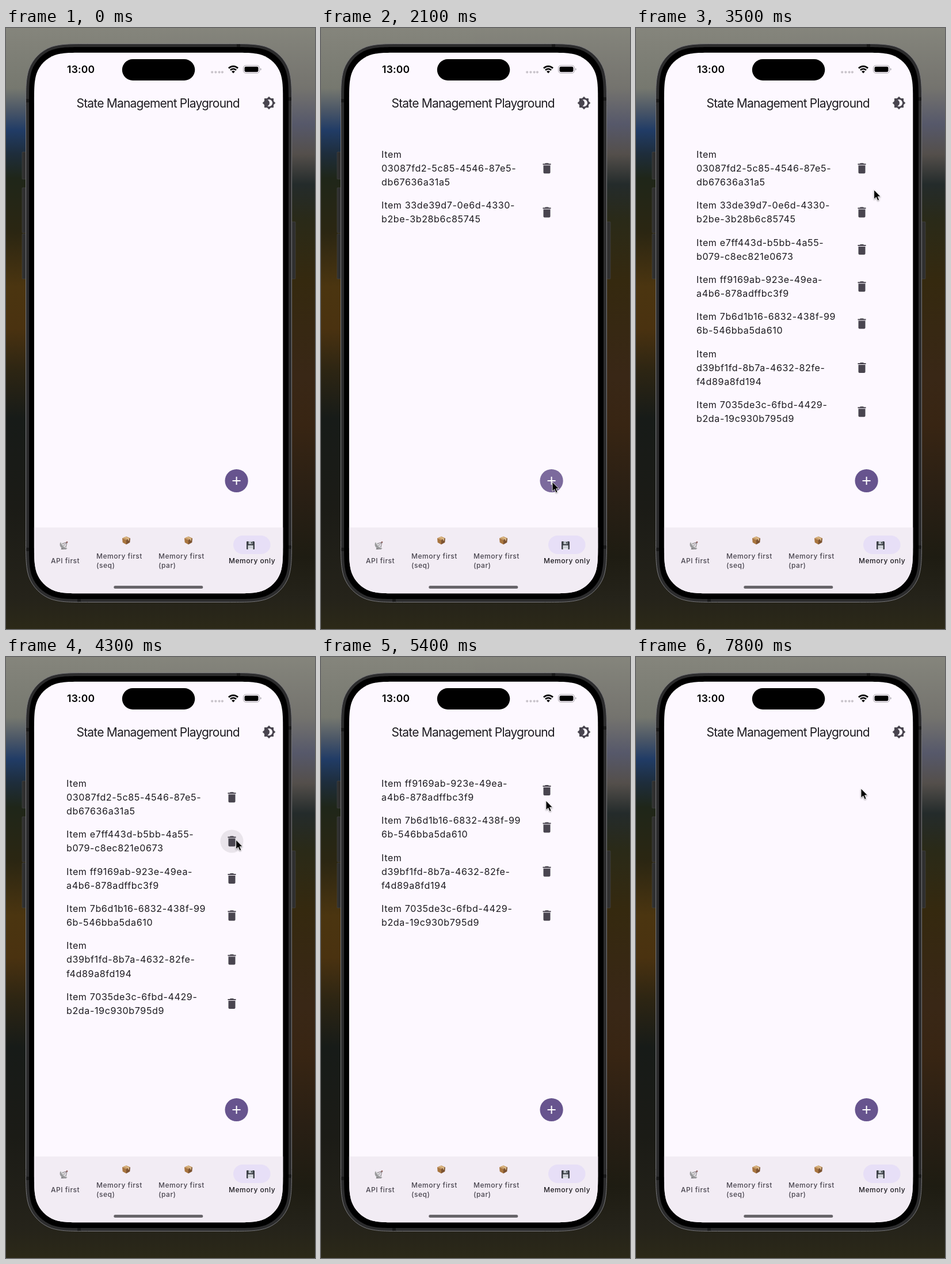
Animation, 537 px wide and 1042 px high, one loop 8 s. Source, as an HTML page:

```html
<!DOCTYPE html>
<html lang="en">
<head>
<meta charset="utf-8">
<title>State Management Playground</title>
<style>
  html, body { margin: 0; width: 100%; height: 100%; overflow: hidden; background: #25241a; }
  svg { display: block; width: 100%; height: 100%; }
  text { font-family: Inter, Roboto, sans-serif; font-optical-sizing: none; fill: #1d1b20; }
  .item { font-size: 16.08px; letter-spacing: .61px; }
  .nav { font-size: 12.06px; font-weight: 500; letter-spacing: .5px; fill: #49454f; }
  .nav.on { fill: #1d1b20; }
  #cursor { filter: drop-shadow(0 1px 1px #0006); }
</style>
</head>
<body>
<svg viewBox="0 0 537 1042">
  <defs>
    <linearGradient id="left" x2="0" y2="1">
      <stop offset="0" stop-color="#85857c"/>
      <stop offset=".1" stop-color="#76786f"/>
      <stop offset=".135" stop-color="#4d5867"/>
      <stop offset=".17" stop-color="#213c66"/>
      <stop offset=".21" stop-color="#1e2d3b"/>
      <stop offset=".25" stop-color="#1f2619"/>
      <stop offset=".34" stop-color="#2b2612"/>
      <stop offset=".43" stop-color="#4b3510"/>
      <stop offset=".5" stop-color="#4a3210"/>
      <stop offset=".57" stop-color="#2d2513"/>
      <stop offset=".65" stop-color="#171b18"/>
      <stop offset=".8" stop-color="#1b1b16"/>
      <stop offset=".95" stop-color="#25231a"/>
      <stop offset="1" stop-color="#2c2918"/>
    </linearGradient>
    <linearGradient id="right" x2="0" y2="1">
      <stop offset="0" stop-color="#85857c"/>
      <stop offset=".1" stop-color="#74736e"/>
      <stop offset=".16" stop-color="#56586a"/>
      <stop offset=".21" stop-color="#544f4b"/>
      <stop offset=".26" stop-color="#242b2b"/>
      <stop offset=".32" stop-color="#2a2a18"/>
      <stop offset=".42" stop-color="#35290f"/>
      <stop offset=".58" stop-color="#392716"/>
      <stop offset=".66" stop-color="#382513"/>
      <stop offset=".78" stop-color="#291f14"/>
      <stop offset=".88" stop-color="#1e1c12"/>
      <stop offset=".95" stop-color="#25231a"/>
      <stop offset="1" stop-color="#2c2918"/>
    </linearGradient>
    <clipPath id="clip"><path id="screen"/></clipPath>
    <path id="trash" fill="#49454f" d="M6 19c0 1.1.9 2 2 2h8c1.1 0 2-.9 2-2V7H6zM19 4h-3.5l-1-1h-5l-1 1H5v2h14z"/>
    <g id="box">
      <path fill="#c99d68" d="M0-7 7-4 0-1-7-4z"/>
      <path fill="#a8753f" d="M-7-4 0-1V7L-6.3 3.6z"/>
      <path fill="#7d5330" d="M7-4 0-1V7L6.3 3.6z"/>
      <path fill="#e3c795" d="M-3.7-5.4 3.3-2.4V.5L5-.3V-3.2L-2-6.2z"/>
    </g>
  </defs>

  <rect width="268.5" height="1042" fill="url(#left)"/>
  <rect x="268" width="269" height="1042" fill="url(#right)"/>

  <!-- phone body -->
  <g fill="#2f2f2f" stroke="#484848" stroke-width=".6">
    <rect x="28" y="215" width="8" height="47" rx="1"/>
    <rect x="28" y="277" width="8" height="78" rx="1"/>
    <rect x="28" y="357" width="8" height="78" rx="1"/>
    <rect x="495" y="336" width="8" height="99" rx="1"/>
  </g>
  <path id="body" fill="#2c2c2d" stroke="#77777a"/>
  <path fill="#1a1a1a" d="M401 28h6v5h-6zM124 990h6v5h-6zM35 123h5v6h-5zM35 901h5v6h-5zM491 120h5v6h-5zM491 897h5v6h-5z"/>
  <path id="bezel"/>

  <g clip-path="url(#clip)">
    <rect x="48" y="42" width="434" height="939" fill="#fdf8ff"/>
    <rect x="48" y="866" width="434" height="115" fill="#f2ecf4"/>
  </g>

  <!-- status bar -->
  <text x="130.2" y="78.3" text-anchor="middle" font-size="17.5" font-weight="600" letter-spacing=".2" style="fill:#000">13:00</text>
  <rect x="201.8" y="54" width="126.5" height="37" rx="18.5"/>
  <path d="M358.2 76.6h.01m6.2 0h.01m6.2 0h.01m5.3 0h.01" stroke="#c9c4cb" stroke-width="4.2" stroke-linecap="round"/>
  <path d="M387 69.8a11.1 11.1 0 0 1 16 0M390 73a7 7 0 0 1 10 0" fill="none" stroke="#000" stroke-width="2.8"/>
  <path d="M395 78.5l-2.9-3a4 4 0 0 1 5.8 0z"/>
  <rect x="412.5" y="65" width="28" height="13.2" rx="4.2" fill="none" stroke="#a5a1a8"/>
  <rect x="414.5" y="67" width="24" height="9.2" rx="2.6"/>
  <path d="M442 69.5q1.6.6 1.6 2.1t-1.6 2.1z" fill="#a5a1a8"/>

  <!-- app bar -->
  <text x="264.2" y="138.2" text-anchor="middle" font-size="21" letter-spacing="-.8">State Management Playground</text>
  <path transform="translate(445 118)" fill="#49454f" d="M20 8.69V4h-4.69L12 .69 8.69 4H4v4.69L.69 12 4 15.31V20h4.69L12 23.31 15.31 20H20v-4.69L23.31 12zM12 18c-.89 0-1.74-.2-2.5-.55C11.56 16.5 13 14.42 13 12s-1.44-4.5-3.5-5.45C10.26 6.2 11.11 6 12 6c3.31 0 6 2.69 6 6s-2.69 6-6 6z"/>

  <!-- navigation bar -->
  <rect x="395" y="880" width="64.5" height="32" rx="16" fill="#e7dff7"/>
  <g transform="translate(101 897)">
    <path d="M-3 2-5.5 7H4L0 2z" fill="#77777a"/>
    <path d="M-6.5-5.5A8.5 8.5 0 0 0 5.5 5.5z" fill="#9a9a9c"/>
    <path d="M-6.5-5.5Q2-2 5.5 5.5-3 3-6.5-5.5z" fill="#d6d6d8"/>
    <path d="M-1 .5 5-5.5M-3-3 5-5.5 3 3" fill="none" stroke="#5b5356" stroke-width=".8"/>
    <circle cx="5" cy="-5.5" r="1.3" fill="#8c5a55"/>
  </g>
  <use href="#box" x="209" y="888.5"/>
  <use href="#box" x="317" y="888.5"/>
  <g transform="translate(418 890)">
    <path d="M0 1q0-1 1-1h12l1 1v12q0 1-1 1H1q-1 0-1-1z" fill="#3c4047"/>
    <path d="M3.5 0h7v5h-7z" fill="#b9bec5"/>
    <path d="M8 1h1.6v3H8z" fill="#3c4047"/>
    <path d="M2.5 7h9v7h-9z" fill="#e4e6ea"/>
    <path d="M3.5 9h7m-7 2h7" stroke="#9b9fb0" stroke-width=".7"/>
  </g>
  <text class="nav" x="78" y="928.3">API first</text>
  <text class="nav" x="157" y="920.3">Memory first<tspan x="157" dy="16">(seq)</tspan></text>
  <text class="nav" x="265" y="920.3">Memory first<tspan x="265" dy="16">(par)</tspan></text>
  <text class="nav on" x="387" y="928.3">Memory only</text>
  <rect x="187.3" y="967" width="155" height="5" rx="2.5" fill="#676469"/>

  <circle id="splash" cx="392.5" r="20" fill="#e9e4eb"/>
  <g id="list"></g>
  <circle id="fab" cx="400.6" cy="785" r="20.1"/>
  <path d="M393.6 785h14m-7-7v14" stroke="#fff" stroke-width="2"/>
  <path id="cursor" d="M0 0V16.3L3.8 12.8 6.4 18.8 9.1 17.6 6.6 11.8H11.5z" stroke="#fff" stroke-width=".9"/>
</svg>

<script>
const LOOP = 8000, TICK = 100, LINE = 24.12, GAP = 16.08, TOP = 207;

// text lines, time added, time deleted
const items = [
  ["Item|03087fd2-5c85-4546-87e5-|db67636a31a5", 1500, 5400],
  ["Item 33de39d7-0e6d-4330-|b2be-3b28b6c85745", 2100, 4300],
  ["Item e7ff443d-b5bb-4a55-|b079-c8ec821e0673", 2300, 4500],
  ["Item ff9169ab-923e-49ea-|a4b6-878adffbc3f9", 2500, 7300],
  ["Item 7b6d1b16-6832-438f-99|6b-546bba5da610", 2700, 6100],
  ["Item|d39bf1fd-8b7a-4632-82fe-|f4d89a8fd194", 2800, 6700],
  ["Item 7035de3c-6fbd-4429-|b2da-19c930b795d9", 3100, 7800]
];

// start, end, centre y of the pressed button
const splashes = [
  [4300, 4800, 319.5], [5500, 5600, 231], [6100, 6200, 307],
  [6700, 6800, 295.3], [7300, 7600, 231]
];

// time, x, y
const path = [
  [100, 517, 872], [500, 450, 815], [900, 404, 790], [1000, 402, 787],
  [3200, 402, 787], [3300, 405, 660], [3400, 411, 420], [3500, 413.6, 280.5],
  [3700, 412, 290], [4100, 399.7, 317], [4900, 399.7, 317], [5000, 398, 300],
  [5200, 391, 249], [5400, 391, 249], [5800, 390.5, 297],
  [6700, 390.5, 297], [7000, 391, 228]
];

const el = id => document.getElementById(id);
const within = (t, from, to) => t >= from && t < to;

// rectangle whose corners ease smoothly into the straight sides
function smoothRect(id, x, y, w, h, r) {
  const curve = [[1.529, 0], [1.088, 0], [.868, 0], [.631, .075], [.373, .169], [.169, .373],
    [.075, .631], [0, .868], [0, 1.088], [0, 1.529]];
  const corner = (right, bottom) => {
    const points = curve.map(([a, b]) =>
      [right ? x + w - a * r : x + a * r, bottom ? y + h - b * r : y + b * r].join(" "));
    if (right === bottom) return points;
    return points.reverse();
  };
  const d = [corner(true, false), corner(true, true), corner(false, true), corner(false, false)]
    .map(c => c);
  const sides = [d[3].slice().reverse(), d[0].slice().reverse(), d[1].slice().reverse(), d[2].slice().reverse()];
  el(id).setAttribute("d", "M" + sides.map(([p, ...rest]) => p + "C" + rest.join(" ")).join("L") + "Z");
}

function cursorAt(t) {
  const i = path.findIndex(p => p[0] > t);
  if (i < 0) return path.at(-1).slice(1);
  const [t0, x0, y0] = path[i - 1], [t1, x1, y1] = path[i];
  const k = (t - t0) / (t1 - t0);
  return [x0 + (x1 - x0) * k, y0 + (y1 - y0) * k];
}

function listAt(t) {
  let y = TOP, out = "";
  for (const [text, added, deleted] of items) {
    if (!within(t, added, deleted)) continue;
    const lines = text.split("|"), height = lines.length * LINE;
    lines.forEach((line, i) => {
      out += `<text class="item" x="105" y="${y + 17.9 + i * LINE}">${line}</text>`;
    });
    out += `<use href="#trash" x="380.5" y="${y + height / 2 - 12}"/>`;
    y += height + GAP;
  }
  return out;
}

let shown = -1;
function draw(now) {
  const t = Math.floor(now % LOOP / TICK) * TICK;
  if (t === shown) return;
  shown = t;
  el("list").innerHTML = listAt(t);
  el("fab").setAttribute("fill", within(t, 1000, 3300) ? "#7c6a9d" : "#67548e");
  const splash = splashes.find(s => within(t, s[0], s[1]));
  el("splash").setAttribute("visibility", splash ? "visible" : "hidden");
  if (splash) el("splash").setAttribute("cy", splash[2]);
  const present = t >= path[0][0];
  el("cursor").setAttribute("visibility", present ? "visible" : "hidden");
  if (present) el("cursor").setAttribute("transform", `translate(${cursorAt(t)})`);
}

smoothRect("body", 34.5, 27.5, 462, 968, 70);
smoothRect("bezel", 40, 33, 451, 957, 64);
smoothRect("screen", 48.9, 42.8, 432.4, 937.4, 57);

const start = performance.now();
function frame() {
  draw(performance.now() - start);
  requestAnimationFrame(frame);
}
frame();
</script>
</body>
</html>
```
